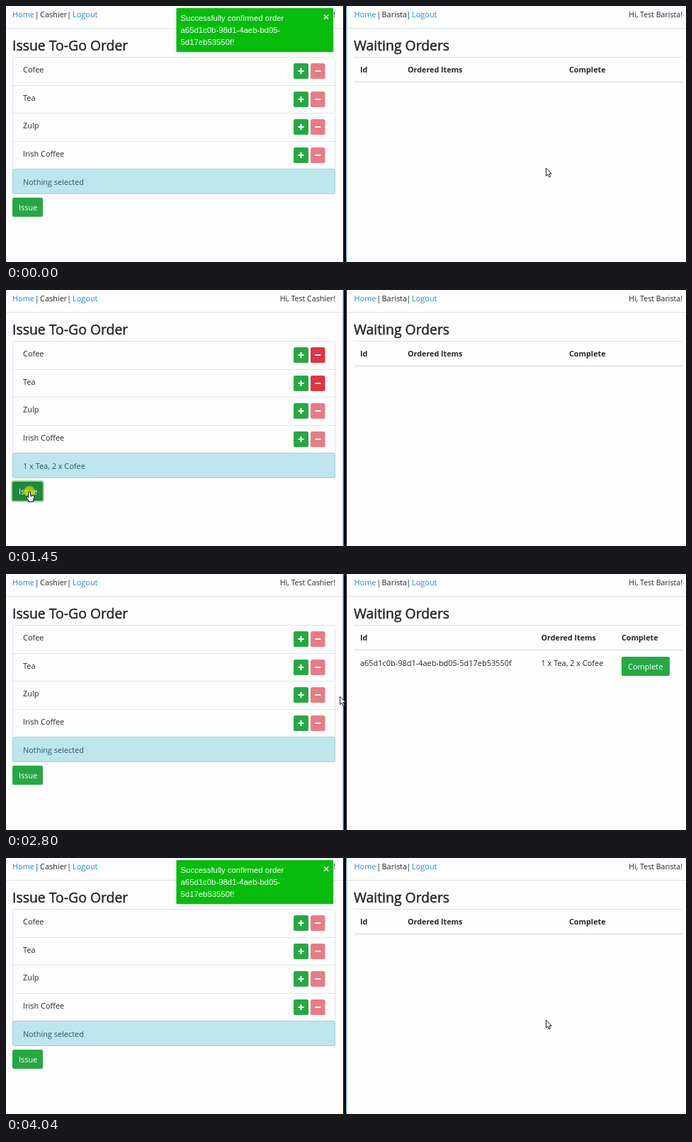
Recreate the animation shown at these times as an HTML page. Size 960 px wide and 362 px high, loop 4090 ms.

```html
<!DOCTYPE html>
<html lang="en">
<head>
<meta charset="utf-8">
<title>Order desk</title>
<style>
html, body { margin: 0; width: 100%; height: 100%; overflow: hidden; background: #fefefe; }
svg { display: block; width: 960px; height: 362px; }
text { font: 10.95px "Open Sans", "Noto Sans", sans-serif; fill: #212529; white-space: pre; }
.head { font-size: 19.4px; stroke: #212529; stroke-width: .45px; }
.bold { font-size: 10.75px; font-weight: 700; }
.link { fill: #1f88e5; }
.white { fill: #fff; }
.hint { fill: #848b92; }
.info { fill: #24566b; }
.user { font-size: 10.6px; text-anchor: end; }
.toast text { font: 11.36px "Liberation Sans", Arial, sans-serif; fill: #fff; }
.toast { filter: drop-shadow(0 1px 3px rgba(0, 0, 0, .15)); }
</style>
</head>
<body>
<svg id="stage" viewBox="0 0 960 362"></svg>
<script>
const LOOP = 4090;
const ORDER = 'a65d1c0b-98d1-4aeb-bd05-5d17eb53550f';
const ITEMS = ['Cofee', 'Tea', 'Zulp', 'Irish Coffee'];
const GREEN = '#28a745', DARK = '#218838', RED = '#dc3545', LINE = '#dee2e6';

// time, x, y of the pointer tip
const POINTER = [
  [0, 762, 229], [50, 750, 222], [350, 416, 95], [700, 416, 95], [900, 414, 139],
  [1100, 414, 139], [1350, 33, 285], [1450, 33, 285], [1650, 272, 118], [1800, 328.5, 139.5],
  [1950, 322, 162], [2250, 322, 162], [2450, 399.5, 170.5], [2700, 399.5, 170.5],
  [3000, 614.5, 178.5], [3300, 851, 142], [3500, 899, 135], [3740, 899, 135], [4040, 762, 229]
];
// time, left edge of the notice
const TOAST = [
  [0, 240.5], [100, 240.5], [150, 232], [300, 490], [2800, 490], [2850, 440], [2900, 310],
  [2950, 237], [3000, 247], [3050, 238], [3100, 240.5], [LOOP, 240.5]
];
const CLICKS = [400, 550, 1000, 1400, 2050, 2550, 3690];

let pointer, hovering;

function at(track, t) {
  const i = track.findIndex(k => k[0] > t);
  if (i < 0) return track[track.length - 1].slice(1);
  const a = track[i - 1], b = track[i];
  const p = (t - a[0]) / (b[0] - a[0]);
  return a.slice(1).map((v, n) => v + (b[n + 1] - v) * p);
}

const text = (x, y, s, cls = '') => `<text x="${x}" y="${y}" class="${cls}">${s}</text>`;
const rect = (x, y, w, h, fill, more = '') =>
  `<rect x="${x}" y="${y}" width="${w}" height="${h}" fill="${fill}" ${more}/>`;
const path = (d, stroke, width = 1, fill = 'none') =>
  `<path d="${d}" fill="${fill}" stroke="${stroke}" stroke-width="${width}"/>`;
const rule = (x1, x2, y, width = 1) => rect(x1, y, x2 - x1, width, LINE);

function inside(x, y, w, h) {
  const [px, py] = pointer;
  return px >= x && px <= x + w && py >= y && py <= y + h;
}

function button(x, y, w, h, label, focus) {
  const over = inside(x, y, w, h);
  hovering = hovering || over;
  const ring = focus ? rect(x - 2, y - 2, w + 4, h + 4, GREEN, 'rx="4" opacity=".45"') : '';
  return ring + rect(x, y, w, h, over ? DARK : GREEN, 'rx="2.6"') + text(x + 9, y + 17.7, label, 'white');
}

function signs(x, y, enabled, focus) {
  const cx = x + 10.5, cy = y + 11;
  const minus = rect(x + 24, y, 20.5, 22, RED, `rx="2.6" opacity="${enabled ? 1 : .65}"`);
  if (enabled && inside(x + 24, y, 20.5, 22)) hovering = true;
  return button(x, y, 21, 22, '', focus) + minus +
    path(`M${cx - 4} ${cy}h8M${cx} ${cy - 4}v8M${cx + 19.6} ${cy}h8.2`, '#fff', 2.1);
}

function nav(x, right, end, role, links) {
  return rule(x, right, 31) + text(links[0], 16, 'Home', 'link') + text(links[1], 16, '|') +
    text(links[2], 16, role) + text(links[3], 16, '|') + text(links[4], 16, 'Logout', 'link') +
    text(end, 16, `Hi, Test ${role}!`, 'user');
}

function itemList(top, right, s) {
  let out = text(9, top - 9.5, 'Issue To-Go Order', 'head');
  out += rect(9.5, top + .5, right - 10, 193, '#fefefe', `stroke="${LINE}" rx="3"`);
  ITEMS.forEach((name, i) => {
    const y = top + i * 39.6;
    if (i) out += rule(10, right - 1, Math.round(y));
    out += text(24, y + 22, name) +
      signs(right - 59, Math.round(y + 9), s.counts[i] > 0, s.focus === i);
  });
  return out + rect(9.5, top + 158.5, right - 10, 35, '#bee5eb', 'stroke="#a3cfd8" rx="2"') +
    text(24, top + 180.5, s.summary, 'info') +
    button(9, top + 199, 43, 27, 'Issue', s.focus === 'issue');
}

function payField(s) {
  const x = 288.5, y = 151.5, w = 80, h = 26;
  const ring = s.paying ? rect(x - 2.5, y - 2.5, w + 5, h + 5, '#bfdeff', 'rx="5"') : '';
  const box = ring + rect(x, y, w, h, '#fff', `rx="3" stroke="${s.paying ? '#80bdff' : '#ced4da'}"`);
  const value = s.paid ? text(297, 168.7, '3') : text(297, 168.7, 'Paid...', 'hint');
  const caretX = s.paid ? 304.5 : 297;
  const caret = s.paying ? path(`M${caretX} 158.5v12`, '#333', .8) : '';
  const spin = s.paying || inside(x, y, w, h)
    ? '<path d="M351.5 162.5l2.7-3.3 2.7 3.3zM351.5 166l2.7 3.3 2.7-3.3z" fill="#444"/>' : '';
  return box + value + caret + spin;
}

function pending(s) {
  const heads = [[18, 128, 'Id'], [172, 111, 'Ordered'], [172, 128, 'Items'],
    [244.5, 128, 'Price'], [288.5, 128, 'Price paid'], [386, 128, 'Confirm']];
  const cells = [[18, 163.5, ORDER.slice(0, 19)], [18, 180.5, ORDER.slice(19)],
    [172, 163.5, '1 x Tea, 2 x'], [172, 180.5, 'Cofee'], [244.5, 163.5, '3.00']];
  return text(9, 79.5, 'Pending Orders', 'head') + rule(9, 453, 89) + rule(9, 453, 140.5, 1.5) +
    heads.map(h => text(...h, 'bold')).join('') + cells.map(c => text(...c)).join('') +
    payField(s) + button(386, 151, 59, 27, 'Confirm', s.confirming);
}

function cashier(s) {
  const right = s.pending ? 453 : 465;
  let out = nav(0, s.pending ? 464 : 476, right, 'Cashier', [9, 40.8, 48, 86, 94]);
  if (s.pending) out += pending(s);
  out += itemList(s.pending ? 233 : 72, right, s);
  if (s.pending) out += rect(464, 0, 12, 362, '#f1f1f1') + rect(465, 0, 9, 344.5, '#c1c1c1');
  return out;
}

function barista(s) {
  const cols = s.waiting ? [500, 755.5, 869] : [500, 567, 795];
  let out = nav(481, 960, 955, 'Barista', [491.5, 523.2, 530.5, 565.3, 573]);
  out += text(491, 62.5, 'Waiting Orders', 'head') + rule(491, 955, 72) + rule(491, 955, 106.5, 1.5);
  ['Id', 'Ordered Items', 'Complete'].forEach((h, i) => out += text(cols[i], 94.3, h, 'bold'));
  if (s.waiting) {
    out += text(500, 129.5, ORDER) + text(755.5, 129.5, '1 x Tea, 2 x Cofee') +
      button(869, 117, 68, 27, 'Complete', s.completing);
  }
  return out;
}

function toast(x, settled) {
  if (x > 478) return '';
  const lines = ['Successfully confirmed order', ORDER.slice(0, 24), ORDER.slice(24) + '!'];
  const cross = path('M208.3 9.2l6.4 6.4M214.7 9.2l-6.4 6.4', settled ? '#f0fbf0' : '#b5ebb6', 1.6);
  return `<g class="toast" transform="translate(${x} 3)">` + rect(0, 0, 221.5, 62, '#07bc0c', 'rx="1"') +
    lines.map((l, i) => text(6, 17.5 + 17 * i, l)).join('') + cross + '</g>';
}

function divider(rightActive) {
  return rightActive
    ? rect(476, 0, 4.3, 362, '#050607') + rect(480.3, 0, 1, 362, '#4ba9dc')
    : rect(475.6, 0, 1.3, 362, '#2580cc') + rect(476.9, 0, 4.1, 362, '#050607');
}

function cursor(typing) {
  const [x, y] = pointer;
  let shape;
  if (typing) shape = path('M-2 -6h1.5l.5 .5 .5 -.5h1.5M0 -5.5v11M-2 6h1.5l.5 -.5 .5 .5h1.5', '#222');
  else if (hovering) {
    shape = path('M-1.3 .8Q0 -.6 1.3 .8V4.8L5.3 5.8Q7 6.4 6.8 8.5L5.7 12V14.4H-.9V12.8' +
      'L-4 9Q-4.4 7 -2.9 7.2L-1.3 8.8Z', '#111', 1, '#fff') + path('M1.3 5v3M3.4 5.6v2.6', '#111', .7);
  } else shape = path('M.4 0V11.3L3 9l1.8 4 1.8-.8L4.9 8.3H8.2Z', '#222', 1, '#fff');
  return `<g transform="translate(${x} ${y})">${shape}</g>`;
}

function stateAt(t) {
  const pick = [[1500, 'Nothing selected'], [1050, '1 x Tea, 2 x Cofee'], [650, '2 x Cofee'],
    [450, '1 x Cofee'], [0, 'Nothing selected']];
  const ordering = t < 1500;
  return {
    summary: pick.find(p => t >= p[0])[1],
    counts: [ordering && t >= 450, ordering && t >= 1050, 0, 0].map(Number),
    focus: !ordering || t < 450 ? null : t < 1050 ? 0 : t < 1450 ? 1 : 'issue',
    pending: t >= 1500 && t < 2700,
    paying: t >= 2050 && t < 2600,
    paid: t >= 2200,
    confirming: t >= 2600,
    waiting: t >= 2700 && t < 3790,
    completing: t >= 3690,
    rightActive: t < 400 || t >= 3100
  };
}

function draw(t) {
  const s = stateAt(t);
  pointer = at(POINTER, t);
  hovering = false;
  const [x, y] = pointer;
  const page = cashier(s) + toast(at(TOAST, t)[0], s.rightActive) +
    rect(476, 0, 484, 362, '#fefefe') + barista(s) + divider(s.rightActive);
  const clicked = CLICKS.some(c => t >= c && t < c + 100);
  const glow = clicked ? `<circle cx="${x}" cy="${y}" r="7.8" fill="#ffe900" opacity=".58"/>` : '';
  return page + glow + cursor(s.pending && inside(288, 151, 81, 27));
}

// The picture steps every 50 ms, with one longer hold before the last click.
function step(t) {
  if (t >= 3690) return 3690 + Math.floor((t - 3690) / 50) * 50;
  return Math.min(3550, Math.floor(t / 50) * 50);
}

const stage = document.getElementById('stage');
const start = performance.now();
let shown = -1;

function tick() {
  const t = step((performance.now() - start) % LOOP);
  if (t !== shown) {
    shown = t;
    stage.innerHTML = draw(t);
  }
  requestAnimationFrame(tick);
}
tick();
</script>
</body>
</html>
```
